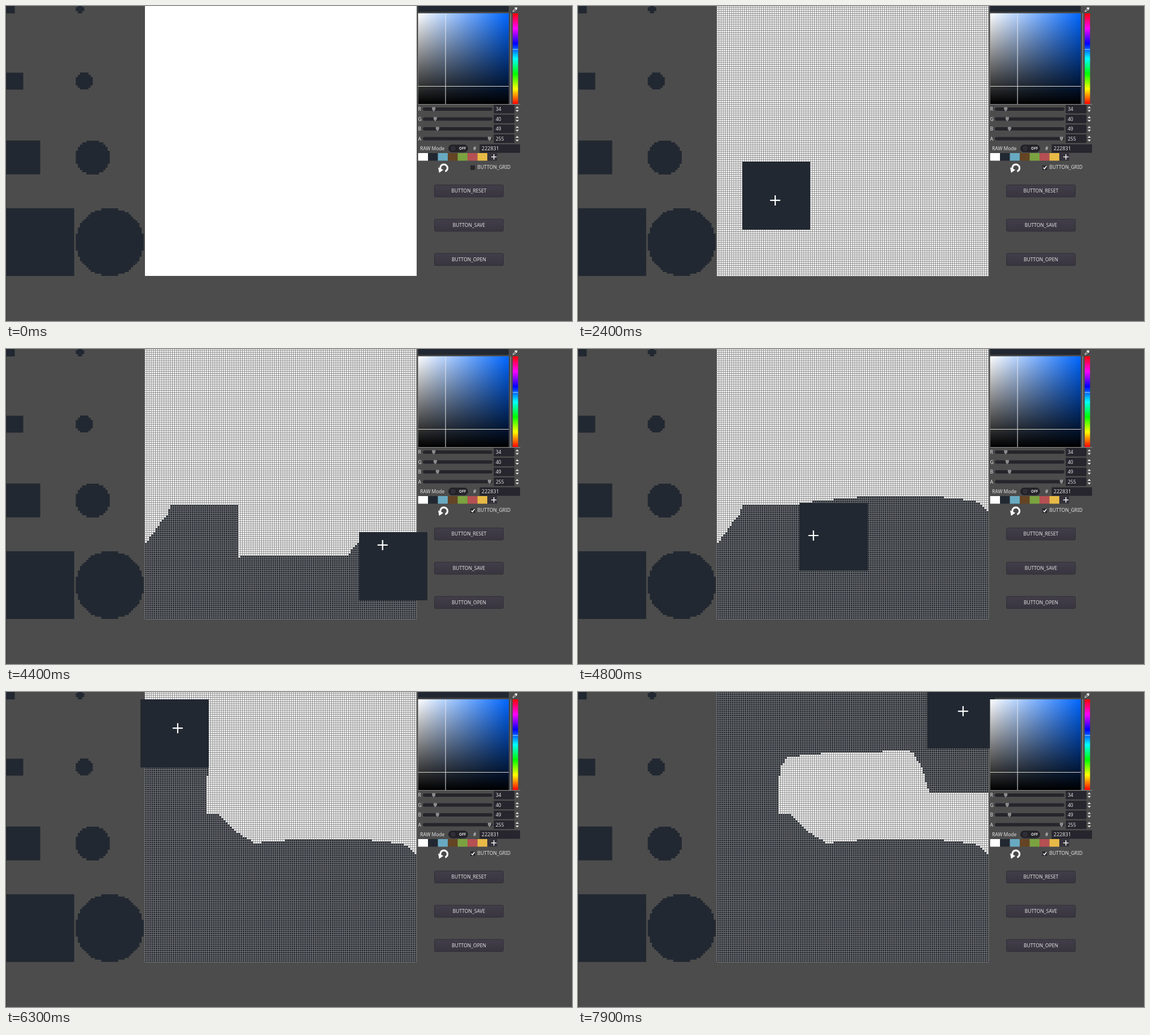
Animation of 1002x559 px, one loop 8 s. Source, as an HTML page with a canvas:

```html
<!DOCTYPE html>
<html lang="en">
<head>
<meta charset="utf-8">
<title>Pixel editor</title>
<style>
  html, body { margin: 0; width: 100%; height: 100%; overflow: hidden; background: #4c4c4c; }
  canvas, svg { position: absolute; left: 0; top: 0; width: 1002px; height: 559px; display: block; }
  text { font-family: "Noto Sans", "Open Sans", sans-serif; font-size: 8.5px; fill: #e2e2e2; }
</style>
</head>
<body>
<canvas id="art" width="1002" height="559"></canvas>
<svg id="ui" viewBox="0 0 1002 559">
  <defs>
    <linearGradient id="sat"><stop stop-color="#fff"/><stop offset="1" stop-color="#06f"/></linearGradient>
    <linearGradient id="val" x2="0" y2="1"><stop stop-color="#000" stop-opacity="0"/><stop offset="1"/></linearGradient>
    <linearGradient id="hue" x2="0" y2="1">
      <stop stop-color="#f00"/><stop offset=".1667" stop-color="#f0f"/><stop offset=".3333" stop-color="#00f"/>
      <stop offset=".5" stop-color="#0ff"/><stop offset=".6667" stop-color="#0f0"/>
      <stop offset=".8333" stop-color="#ff0"/><stop offset="1" stop-color="#f00"/>
    </linearGradient>
    <linearGradient id="btn" x2="0" y2="1"><stop stop-color="#413e49"/><stop offset="1" stop-color="#38353f"/></linearGradient>
  </defs>

  <rect x="729.5" width="160.5" height="10.5" fill="#222831"/>
  <g stroke="#f0f0f0" fill="none">
    <path d="M897.5 10l.6-2.2 4-4 1.6 1.6-4 4z"/>
    <path d="M901 2.8l3.4 3.4M903 4.6l1.9-2" stroke-width="2"/>
  </g>
  <rect x="729.5" y="13" width="160.5" height="161" fill="url(#sat)"/>
  <rect x="729.5" y="13" width="160.5" height="161" fill="url(#val)"/>
  <rect x="777.6" y="13" width="1" height="161" fill="#e8e8e8"/>
  <rect x="729.5" y="142" width="160.5" height="1" fill="#dcdcd0"/>
  <rect x="893" y="13" width="1" height="161" fill="#a4a4a4"/>
  <rect x="897" y="13" width="9.5" height="161" fill="url(#hue)"/>
  <rect x="897" y="76.5" width="9.5" height="1" fill="#bfe0ff"/>
  <rect x="729.5" y="174" width="181" height="1" fill="#8c8c8c"/>
  <g id="sliders"></g>

  <text x="733" y="256">RAW Mode</text>
  <rect x="783" y="246" width="35" height="13.4" rx="6.7" fill="#242329"/>
  <circle cx="791.5" cy="252.7" r="5.6" fill="#2f2d35" stroke="#19181c"/>
  <text x="802" y="255.2" style="font-size:6.5px;font-weight:700">OFF</text>
  <text x="827" y="256">#</text>
  <rect x="838.5" y="245.5" width="71.5" height="15" fill="#27252d"/>
  <text x="842" y="256" style="font-size:9px">222831</text>
  <g id="presets"></g>
  <path d="M859 267.8h9.4M863.7 263v9.5" stroke="#eee" stroke-width="1.6"/>

  <path d="M777.5 293.5A6.4 6.4 0 1 0 769 289" fill="none" stroke="#fff" stroke-width="3.2"/>
  <path d="M765 286.5l9.2 4.2-7.4 5.3z" fill="#fff"/>
  <rect x="822" y="282.7" width="8.4" height="8.4" rx="1" fill="#29282e"/>
  <path id="tick" d="M823.8 286.8l2 2.2 3.6-5" fill="none" stroke="#fff" stroke-width="1.6"/>
  <text x="834.6" y="289.3">BUTTON_GRID</text>
  <g id="buttons"></g>

  <g id="cursor">
    <path d="M-9.7 0H9.7M0-9.7V9.7" stroke="#222831" stroke-width="4.4"/>
    <path d="M-9 0H9M0-9V9" stroke="#fff" stroke-width="2.2"/>
  </g>
</svg>
<script>
const LOOP = 8000, STEP = 100, N = 128, BRUSH = 32;
const CELL = 481 / N, OX = 245.8, OY = -1.6, INK = '#222831';
const PAINT_FROM = 2400, GRID_ON = 900, BRUSH_ON = 2100;
const $ = id => document.getElementById(id);
const g = $('art').getContext('2d');

// Pointer before the brush is in use: time, x, y
const approach = [[300, 872, 4], [900, 901, 290], [1200, 901, 290], [1700, 80, 419], [2100, 355, 329]];

// Brush corner in cells: time, column, row
const ground = [
  [2200, 13, 72], [2400, 12, 74], [2700, 12, 74], [2900, 11, 78.4], [2950, 9, 80], [3200, 0, 93],
  [3300, 0, 98], [3310, 2, 99], [3390, 44, 99], [3392, 45, 98], [3600, 57, 98], [3700, 58, 98],
  [3800, 58, 98], [3900, 78, 98], [4100, 95, 98], [4200, 97, 96], [4300, 102, 90], [4400, 101, 87],
  [4500, 96, 77], [4600, 92, 73], [4700, 89, 72]
];
const rim = [
  [4730, 75, 70.4], [4745, 67, 70.4], [4800, 39, 73], [5000, 20, 72], [5200, 12, 67], [5400, 2, 58],
  [5500, -2, 71], [5600, -3, 70], [5800, -4, 56], [6200, -3, 12], [6300, -2, 4], [6500, 1, -1],
  [6600, 6, -1.45], [6700, 16, -2.45], [6900, 45, -3.45], [7000, 60, -4], [7200, 87, -4],
  [7300, 92, -3.4], [7400, 96, 3], [7500, 98, 9], [7600, 100, 16], [7900, 99, -5], [8000, 100, -6.5]
];
const stroke = ground.concat(rim);

function along(keys, t) {
  let i = 1;
  while (i < keys.length - 1 && keys[i][0] < t) i++;
  const [t0, x0, y0] = keys[i - 1], [t1, x1, y1] = keys[i];
  const k = Math.min(1, Math.max(0, (t - t0) / (t1 - t0)));
  return [x0 + (x1 - x0) * k, y0 + (y1 - y0) * k];
}
const brushAt = t => along(stroke, t).map(Math.round);
const px = c => Math.round(OX + c * CELL);
const py = r => Math.round(OY + r * CELL);

// The pointer runs one update ahead of the brush
function pointerAt(t) {
  if (t < BRUSH_ON) return along(approach, t);
  const next = t >= 2400 && t < 2800 ? 2800 : t >= 3700 && t < 3900 ? 3900 : t + STEP;
  const [c, r] = along(stroke, next);
  return [OX + (c + BRUSH / 2) * CELL, OY + (r + BRUSH / 2) * CELL];
}

// Moment at which each cell is first covered
const inkTime = new Float32Array(N * N).fill(Infinity);
let last = '';
for (let t = PAINT_FROM; t < LOOP; t++) {
  const [c, r] = brushAt(t);
  if (last === (last = c + ',' + r)) continue;
  for (let y = Math.max(0, r); y < Math.min(N, r + BRUSH); y++)
    for (let x = Math.max(0, c); x < Math.min(N, c + BRUSH); x++)
      inkTime[y * N + x] = Math.min(inkTime[y * N + x], t);
}

function box(x, y, w, h, fill) {
  g.fillStyle = fill;
  g.fillRect(x, y, w, h);
}

function drawPalette() {
  box(0, 0, 1002, 559, '#4c4c4c');
  box(0, 0, 1, 559, '#3b3b3b');
  for (let i = 0, size = 4; i < 4; i++, size *= 2) {
    const top = -1.9 + i * 120.26, r = size / 2;
    box(.5, top, size * CELL, size * CELL, INK);
    for (let y = 0; y < size; y++) {
      const dy = y + .5 - r;
      const half = Math.floor(Math.sqrt(r * r - dy * dy) + .5);
      const y0 = Math.round(top + y * CELL), y1 = Math.round(top + (y + 1) * CELL);
      box(123.5 + (r - half) * CELL, y0, 2 * half * CELL, y1 - y0, INK);
    }
  }
}

function drawInk(t) {
  for (let y = 0; y < N; y++)
    for (let x = 0; x < N; x++) {
      if (inkTime[y * N + x] > t) continue;
      const from = x;
      while (x < N && inkTime[y * N + x] <= t) x++;
      box(px(from), py(y), px(x) - px(from), py(y + 1) - py(y), INK);
    }
}

function drawGrid() {
  g.beginPath();
  for (let i = 0; i <= N; i++) {
    const x = OX + i * CELL, y = OY + i * CELL;
    g.moveTo(x, 0);
    g.lineTo(x, py(N));
    g.moveTo(px(0), y);
    g.lineTo(px(N), y);
  }
  g.strokeStyle = '#808080';
  g.lineWidth = .94;
  g.stroke();
}

function draw(t) {
  drawPalette();
  box(px(0), py(0), px(N) - px(0), py(N) - py(0), '#fff');
  if (t >= PAINT_FROM) drawInk(t);
  if (t >= GRID_ON) drawGrid();
  if (t >= BRUSH_ON) {
    const [c, r] = brushAt(t);
    box(px(c), py(r), px(c + BRUSH) - px(c), py(r + BRUSH) - py(r), INK);
  }
  $('tick').style.display = t >= GRID_ON ? '' : 'none';
  $('cursor').style.display = t >= 300 ? '' : 'none';
  $('cursor').setAttribute('transform', `translate(${pointerAt(t).map(v => v.toFixed(1))})`);
}

const sliders = { R: 34, G: 40, B: 49, A: 255 };
$('sliders').innerHTML = Object.entries(sliders).map(([name, value], i) => {
  const x = 742 + value * .447, y = 183 + i * 17.5;
  return `<text x="729.5" y="${y + 3}">${name}</text>
    <rect x="738" y="${y - 3}" width="123" height="6" rx="3" fill="#26252b"/>
    <path d="M${x - 3} ${y - 3.5}h6v4l-3 3.8l-3 -3.8z" fill="#8b8b8b"/>
    <rect x="863.5" y="${y - 7.5}" width="36.5" height="15" fill="#27252d"/>
    <text x="867" y="${y + 3}">${value}</text>
    <path d="M902 ${y - 1.6}l3 -3.4l3 3.4zM902 ${y + 1.6}l3 3.4l3 -3.4z" fill="#e0e0e0"/>`;
}).join('');

const presets = ['#fff', INK, '#68aac2', '#644424', '#7ba240', '#b55053', '#e7b946', '#35323c'];
$('presets').innerHTML = presets.map((fill, i) =>
  `<rect x="${729.6 + i * 17.5}" y="261" width="17.5" height="13.5" fill="${fill}"/>`).join('');

$('buttons').innerHTML = ['RESET', 'SAVE', 'OPEN'].map((name, i) => {
  const y = 328 + i * 60.8;
  return `<rect x="758.5" y="${y - 10.5}" width="122" height="21.5" rx="2" fill="url(#btn)" stroke="#302e36"/>
    <text x="819.5" y="${y + 3}" text-anchor="middle">BUTTON_${name}</text>`;
}).join('');

let start, shown = -1;
function tick(now) {
  start ??= now;
  const t = Math.floor(((now - start) % LOOP) / STEP) * STEP;
  if (t !== shown) draw(shown = t);
  requestAnimationFrame(tick);
}
draw(0);
requestAnimationFrame(tick);
</script>
</body>
</html>
```
